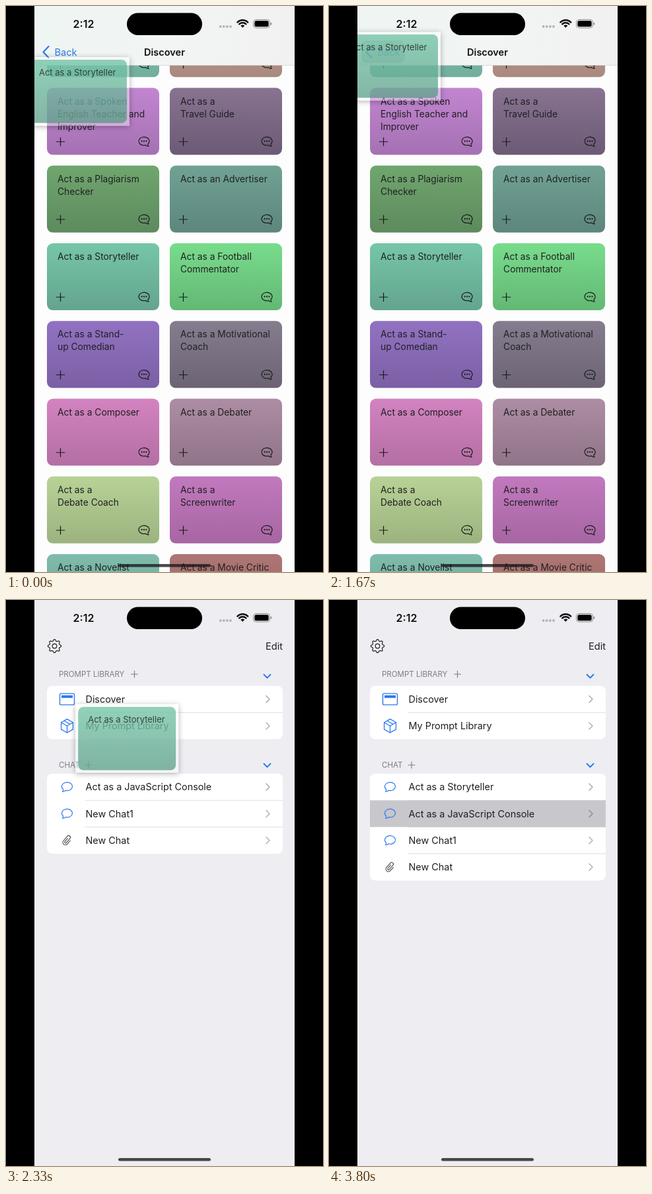
Recreate the animation shown at these times as an HTML page with a canvas. Size 480 by 854 pixels, loop 3940 ms.

```html
<!DOCTYPE html>
<html lang="en">
<head>
<meta charset="utf-8">
<title>Drag a prompt into chat</title>
<style>
  html, body { margin: 0; width: 100%; height: 100%; overflow: hidden; background: #000; }
  canvas { display: block; width: 480px; height: 854px; }
</style>
</head>
<body>
<canvas id="stage"></canvas>
<script>
const LOOP = 3940, W = 480, H = 854, LEFT = 43, RIGHT = 437;
const BLUE = '#2f78ee', INK = '#202022', SELECTED = '#c7c7cc';
const canvas = document.getElementById('stage');
const ctx = canvas.getContext('2d');
const dpr = window.devicePixelRatio || 1;
canvas.width = W * dpr;
canvas.height = H * dpr;

// Each card: title lines, top colour, bottom colour
const CARDS = [
  [[], '#7cc4af', '#72ae9d'], [[], '#bd9b92', '#aa897f'],
  [['Act as a Spoken', 'English Teacher and', 'Improver'], '#c285d1', '#a571b3'],
  [['Act as a', 'Travel Guide'], '#887391', '#6b5a76'],
  [['Act as a Plagiarism', 'Checker'], '#70a66e', '#5d8a5e'],
  [['Act as an Advertiser'], '#70a294', '#5d867c'],
  [['Act as a Storyteller'], '#76c6a9', '#64a48e'],
  [['Act as a Football', 'Commentator'], '#78dc8c', '#63b874'],
  [['Act as a Stand-', 'up Comedian'], '#9172c1', '#7b5fa5'],
  [['Act as a Motivational', 'Coach'], '#857c8e', '#6c6474'],
  [['Act as a Composer'], '#d283c0', '#b46fa4'],
  [['Act as a Debater'], '#ad8da3', '#907488'],
  [['Act as a', 'Debate Coach'], '#b8d296', '#9cb37f'],
  [['Act as a', 'Screenwriter'], '#c279be', '#a666a2'],
  [['Act as a Novelist'], '#7fbcab', '#6a9f90'],
  [['Act as a Movie Critic'], '#ae7674', '#946361']
];

// Drag preview path: time, x, y
const PATH = [
  [0, 35, 81], [150, 28, 65], [330, 19, 47], [520, 17, 42], [930, 17, 42], [1670, 17, 43],
  [1850, 17, 43], [2130, 42, 83], [2330, 109, 161], [2600, 145, 229], [3000, 152, 245], [3330, 152, 247]
];

const clamp = v => Math.max(0, Math.min(1, v));
const ramp = (t, from, to) => { const u = clamp((t - from) / (to - from)); return u * u * (3 - 2 * u); };

// Monotone cubic interpolation of one column of PATH
function along(t, col) {
  const slope = i => i < 0 || i > PATH.length - 2 ? 0
    : (PATH[i + 1][col] - PATH[i][col]) / (PATH[i + 1][0] - PATH[i][0]);
  const tangent = i => {
    const a = slope(i - 1), b = slope(i);
    return i === 0 ? b : a * b > 0 ? 2 * a * b / (a + b) : 0;
  };
  const last = PATH.length - 1;
  if (t >= PATH[last][0]) return PATH[last][col];
  let i = 0;
  while (t >= PATH[i + 1][0]) i++;
  const d = PATH[i + 1][0] - PATH[i][0], u = (t - PATH[i][0]) / d, v = 1 - u;
  return v * v * (1 + 2 * u) * PATH[i][col] + u * u * (3 - 2 * u) * PATH[i + 1][col]
    + d * u * v * (v * tangent(i) - u * tangent(i + 1));
}

function scoped(draw, alpha = 1) {
  ctx.save();
  ctx.globalAlpha *= alpha;
  draw();
  ctx.restore();
}

function box(x, y, w, h, r, fill) {
  ctx.beginPath();
  ctx.roundRect(x, y, w, h, r);
  if (fill) { ctx.fillStyle = fill; ctx.fill(); }
}

function disc(x, y, r, fill) {
  ctx.beginPath();
  ctx.arc(x, y, r, 0, 7);
  ctx.fillStyle = fill;
  ctx.fill();
}

function text(s, x, centerY, size, color = INK, weight = 400, align = 'left') {
  ctx.font = `${weight} ${size}px Inter, sans-serif`;
  ctx.textAlign = align;
  ctx.fillStyle = color;
  ctx.fillText(s, x, centerY + size * 0.36);
}

function stroke(color, width, ...lines) {
  ctx.beginPath();
  for (const line of lines) line.forEach(([x, y], i) => i ? ctx.lineTo(x, y) : ctx.moveTo(x, y));
  ctx.strokeStyle = color;
  ctx.lineWidth = width;
  ctx.stroke();
}

function plus(x, y, r, color, width = 1.2) {
  stroke(color, width, [[x - r, y], [x + r, y]], [[x, y - r], [x, y + r]]);
}

// Speech bubble; side is 1 for a tail on the right, -1 on the left
function bubble(x, y, side, color) {
  scoped(() => {
    ctx.translate(x, y);
    ctx.scale(side, 1);
    ctx.beginPath();
    ctx.ellipse(0, -0.8, 8, 6.3, 0, 1.25, 0.75 + Math.PI * 2);
    ctx.quadraticCurveTo(6, 6, 7, 7);
    ctx.quadraticCurveTo(4, 7, 2.5, 5.2);
    ctx.strokeStyle = color;
    ctx.lineWidth = 1.2;
    ctx.stroke();
  });
}

function gradient(y, h, top, bottom) {
  const g = ctx.createLinearGradient(0, y, 0, y + h);
  g.addColorStop(0, top);
  g.addColorStop(1, bottom);
  return g;
}

function card([lines, top, bottom], index) {
  const x = 62 + (index % 2) * 186, y = 6.3 + Math.floor(index / 2) * 117.25;
  box(x, y, 170, 101, 9, gradient(y, 101, top, bottom));
  lines.forEach((line, i) => text(line, x + 16, y + 20 + i * 19.2, 13.8));
  plus(x + 20.5, y + 81.2, 6.2, '#1a1a1a');
  bubble(x + 147, y + 81.2, 1, '#1a1a1a');
  for (const dx of [-3.4, 0, 3.4]) disc(x + 147 + dx, y + 80.4, 1.1, '#1a1a1a');
}

const ICONS = {
  window(x, y) {
    box(x - 11, y - 8.5, 22, 17, 2);
    ctx.strokeStyle = BLUE;
    ctx.lineWidth = 1.4;
    ctx.stroke();
    box(x - 8.5, y - 6, 17, 4, 0.5, BLUE);
  },
  package(x, y) {
    const at = k => [x + 10.3 * Math.sin(k * Math.PI / 3), y - 10.3 * Math.cos(k * Math.PI / 3)];
    stroke(BLUE, 1.3, [0, 1, 2, 3, 4, 5, 6].map(at), [at(5), [x, y], at(1)], [[x, y], at(3)],
      [[x - 4.5, y - 7.7], [x + 4.5, y - 2.6]]);
  },
  chat(x, y) { bubble(x, y, -1, BLUE); },
  clip(x, y) {
    scoped(() => {
      ctx.translate(x, y);
      ctx.rotate(0.72);
      ctx.beginPath();
      ctx.moveTo(3.8, -3);
      ctx.lineTo(3.8, 4);
      ctx.arc(0, 4, 3.8, 0, Math.PI);
      ctx.lineTo(-3.8, -5);
      ctx.arc(-1.2, -5, 2.6, Math.PI, 0);
      ctx.lineTo(1.4, 3.5);
      ctx.arc(0, 3.5, 1.4, 0, Math.PI);
      ctx.lineTo(-1.4, -3);
      ctx.strokeStyle = '#444';
      ctx.lineWidth = 1.1;
      ctx.stroke();
    });
  }
};

const ROW = 40.3;

function row(y, icon, label, alpha = 1, highlight = 0) {
  scoped(() => {
    if (highlight) scoped(() => box(62, y, 357, ROW, 0, SELECTED), highlight);
    const cy = y + ROW / 2;
    ICONS[icon](92.5, cy);
    text(label, 120.5, cy, 14.4);
    stroke(highlight ? '#8e8e93' : '#b4b4b8', 1.6, [[394, cy - 5], [399, cy], [394, cy + 5]]);
  }, alpha);
}

function group(y, count, drawRows) {
  scoped(() => {
    box(62, y, 357, ROW * count, 8, '#fff');
    ctx.clip();
    for (let i = 1; i < count; i++) stroke('#dedee2', 1, [[120, y + i * ROW], [419, y + i * ROW]]);
    drawRows();
  });
}

function header(label, y, plusX, chevronY) {
  text(label, 80, y, 11.5, '#7e7e84');
  plus(plusX, y, 5, '#7e7e84', 1.1);
  stroke(BLUE, 1.9, [[390.5, chevronY - 2.5], [395.5, chevronY + 2.5], [400.5, chevronY - 2.5]]);
}

function sidebar(t, shown) {
  box(LEFT, 0, RIGHT - LEFT, H, 0, '#eeedf2');
  scoped(() => {
    ctx.translate(-118 * (1 - shown), 0);
    header('PROMPT LIBRARY', 112, 194.5, 115);
    group(129.5, 2, () => {
      row(129.5, 'window', 'Discover', 1, 1 - shown);
      row(129.5 + ROW, 'package', 'My Prompt Library');
    });
    header('CHAT', 249, 125, 249.5);
    const inserted = ramp(t, 3380, 3680), top = 262;
    group(top, 3 + inserted, () => {
      if (inserted) row(top, 'chat', 'Act as a Storyteller', inserted);
      const y = top + inserted * ROW;
      row(y, 'chat', 'Act as a JavaScript Console', 1, ramp(t, 2700, 2800));
      row(y + ROW, 'chat', 'New Chat1');
      row(y + 2 * ROW, 'clip', 'New Chat');
    });
  });
  box(LEFT, 0, RIGHT - LEFT, H, 0, `rgba(0,0,0,${0.12 * (1 - shown)})`);
}

function discover(shown) {
  const offset = (RIGHT - LEFT) * shown;
  scoped(() => {
    ctx.translate(offset, 0);
    ctx.shadowColor = 'rgba(0,0,0,.12)';
    ctx.shadowBlur = 10 * dpr * (shown > 0);
    box(LEFT, 0, RIGHT - LEFT, H, 0, '#fdfdfd');
    ctx.shadowColor = 'transparent';
    CARDS.forEach(card);
    const bar = ctx.createLinearGradient(LEFT, 0, RIGHT, 0);
    bar.addColorStop(0, '#eff5f3');
    bar.addColorStop(0.5, '#f1f5f4');
    bar.addColorStop(1, '#f2f1f1');
    box(LEFT, 0, RIGHT - LEFT, 89.5, 0, bar);
    stroke('#cfcfcf', 0.7, [[LEFT, 89.5], [RIGHT, 89.5]]);
  });
}

function gear(x, y) {
  const outline = [];
  for (let i = 0; i <= 32; i++) {
    const r = i % 4 < 2 ? 10 : 7.8, a = (i - 0.5) * Math.PI / 16;
    outline.push([x + r * Math.cos(a), y + r * Math.sin(a)]);
  }
  stroke(INK, 1.2, outline);
  ctx.beginPath();
  ctx.arc(x, y, 3.3, 0, 7);
  ctx.stroke();
}

function navigation(t, shown) {
  scoped(() => {
    scoped(() => box(49, 52, 66, 34, 8, 'rgba(0,0,0,.17)'), ramp(t, 400, 530));
    stroke(BLUE, 2.2, [[64.5, 61], [56.5, 69.5], [64.5, 78]]);
    text('Back', 73.5, 69.5, 14.6, BLUE);
  }, 1 - shown);
  scoped(() => text('Discover', 240 + 188 * shown, 69.5, 14.5, '#111', 600, 'center'), (1 - shown) * (1 - 0.5 * shown));
  scoped(() => {
    gear(73.5, 69.5);
    text('Edit', 419, 69.8, 14.6, INK, 400, 'right');
  }, clamp(shown * 1.35));
}

function statusBar() {
  text('2:12', 117.5, 27, 16, '#111', 600, 'center');
  box(183, 10.5, 114, 33.5, 17, '#000');
  for (let i = 0; i < 4; i++) disc(324.7 + i * 5.1, 31, 1.9, '#b4b4b6');
  ctx.strokeStyle = '#111';
  ctx.lineWidth = 2.4;
  for (const r of [11.2, 7.3]) {
    ctx.beginPath();
    ctx.arc(358.3, 32.5, r, -Math.PI * 0.75, -Math.PI * 0.25);
    ctx.stroke();
  }
  ctx.beginPath();
  ctx.moveTo(358.3, 32.8);
  ctx.arc(358.3, 32.8, 4.3, -Math.PI * 0.75, -Math.PI * 0.25);
  ctx.fillStyle = '#111';
  ctx.fill();
  box(374.5, 20.5, 25, 12.5, 4);
  ctx.strokeStyle = '#8a8a8c';
  ctx.lineWidth = 1;
  ctx.stroke();
  box(376.3, 22.2, 21.4, 9, 2.5, '#000');
  box(400.7, 24.8, 1.5, 4, 1, '#8a8a8c');
}

function preview(t) {
  const dropped = ramp(t, 3350, 3620);
  if (dropped === 1) return;
  scoped(() => {
    ctx.translate(along(t, 1) + 74, along(t, 2) + 47.5 + 10 * dropped);
    ctx.scale(1 - 0.5 * dropped, 1 - 0.5 * dropped);
    ctx.translate(-74, -47.5);
    // Shadow only outside the frame, so the translucent card stays clean
    scoped(() => {
      ctx.beginPath();
      ctx.rect(-60, -60, 270, 220);
      ctx.rect(-4, -4, 156, 103.5);
      ctx.clip('evenodd');
      ctx.shadowColor = 'rgba(0,0,0,.3)';
      ctx.shadowBlur = 9 * dpr;
      ctx.shadowOffsetY = 1.5 * dpr;
      box(-4, -4, 156, 103.5, 1, '#fff');
    });
    ctx.beginPath();
    ctx.rect(-4, -4, 156, 103.5);
    ctx.roundRect(0, 0, 148, 95.5, 8);
    ctx.fillStyle = 'rgba(255,255,255,.4)';
    ctx.fill('evenodd');
    scoped(() => {
      box(0, 0, 148, 95.5, 8, gradient(0, 95.5, '#76c6a9', '#64a48e'));
      text('Act as a Storyteller', 15, 19.3, 13);
    }, 0.8);
    const badge = ramp(t, 2700, 2790) * (1 - ramp(t, 3330, 3400));
    scoped(() => {
      disc(152.5, -4, 9.6, '#58bd69');
      plus(152.5, -4, 4.6, '#fff', 1.6);
    }, badge);
  }, 1 - dropped);
}

function render(t) {
  ctx.setTransform(dpr, 0, 0, dpr, 0, 0);
  ctx.fillStyle = '#000';
  ctx.fillRect(0, 0, W, H);
  const swing = Math.max(0, t - 1670) * 0.01655;
  const shown = t > 2180 ? 1 : 1 - (1 + swing) * Math.exp(-swing);
  scoped(() => {
    ctx.beginPath();
    ctx.rect(LEFT, 0, RIGHT - LEFT, H);
    ctx.clip();
    ctx.lineJoin = ctx.lineCap = 'round';
    if (shown > 0) sidebar(t, shown);
    if (shown < 1) discover(shown);
    navigation(t, shown);
    statusBar();
    box(170, 842, 140, 4.6, 2.3, 'rgba(25,25,28,.78)');
    preview(t);
  });
}

function tick() {
  render(performance.now() % LOOP);
  requestAnimationFrame(tick);
}
tick();
</script>
</body>
</html>
```
